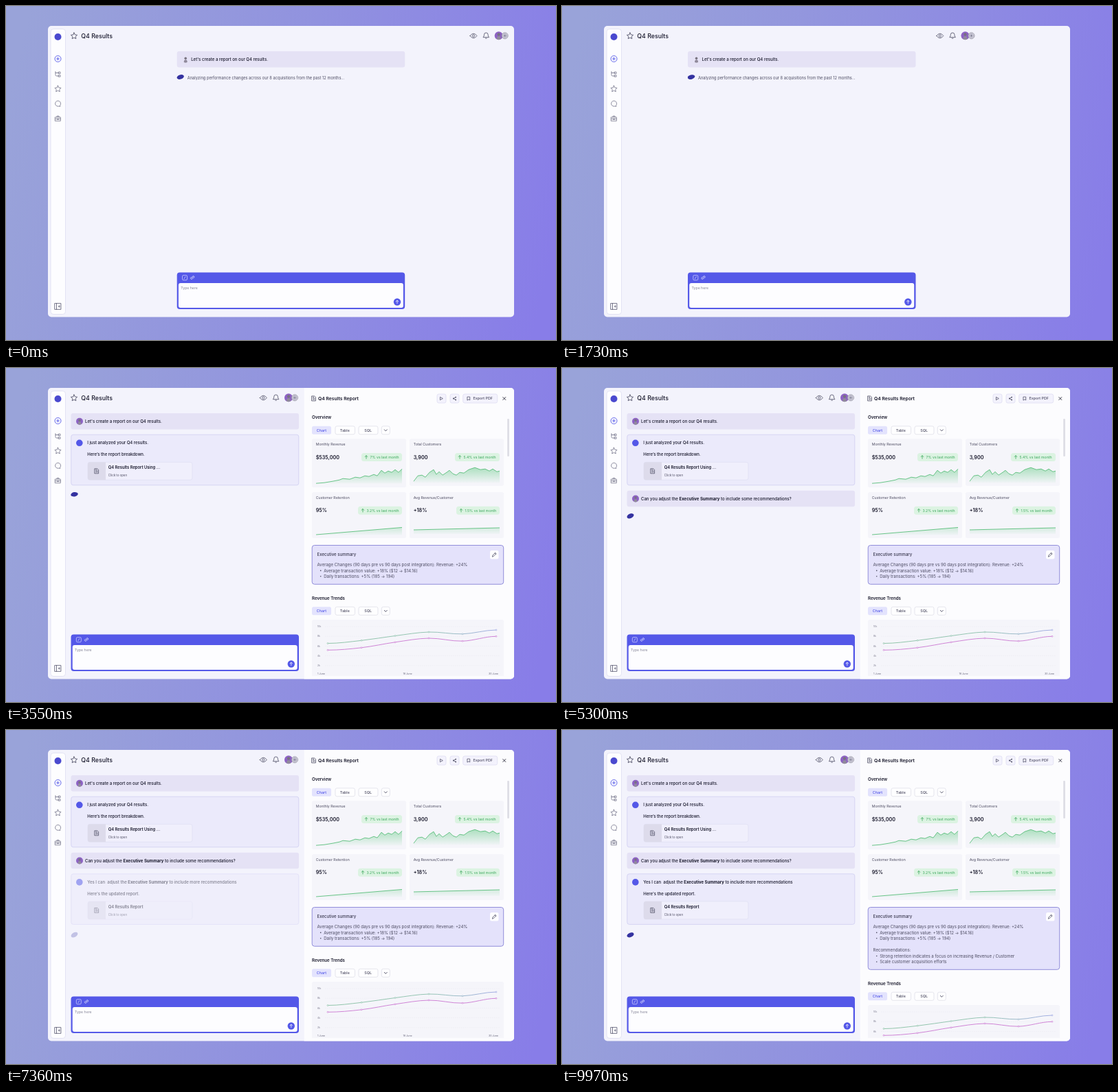
These frames come from a looping animation (800x487 px, 10000 ms). An HTML page with a canvas:

```html
<!DOCTYPE html>
<html lang="en">
<head>
<meta charset="utf-8">
<title>Q4 Results</title>
<style>
html, body { margin: 0; width: 100%; height: 100%; overflow: hidden; background: #9194de; }
canvas { display: block; width: 800px; height: 487px; }
</style>
</head>
<body>
<canvas id="stage"></canvas>
<script>
const W = 800, H = 487, LOOP = 10000;
const canvas = document.getElementById('stage');
const ctx = canvas.getContext('2d');
const dpr = window.devicePixelRatio || 1;
canvas.width = W * dpr;
canvas.height = H * dpr;

const INK = '#17172a', SOFT = '#4c4b61', ICON = '#4a4a60', BLUE = '#5458e8', GREEN = '#38a65a';

function ease(t, from, to) {
  const k = Math.min(1, Math.max(0, (t - from) / (to - from)));
  return k * k * (3 - 2 * k);
}

function group(dx, dy, alpha, draw) {
  if (alpha <= 0) return;
  ctx.save();
  ctx.translate(dx, dy);
  ctx.globalAlpha *= alpha;
  draw();
  ctx.restore();
}

function box(x, y, w, h, r, fill, stroke, width = 0.7) {
  ctx.beginPath();
  ctx.roundRect(x, y, w, h, r);
  if (fill) { ctx.fillStyle = fill; ctx.fill(); }
  if (stroke) { ctx.strokeStyle = stroke; ctx.lineWidth = width; ctx.stroke(); }
}

function disc(x, y, r, fill, stroke, width = 0.8) {
  ctx.beginPath();
  ctx.arc(x, y, r, 0, 7);
  if (fill) { ctx.fillStyle = fill; ctx.fill(); }
  if (stroke) { ctx.strokeStyle = stroke; ctx.lineWidth = width; ctx.stroke(); }
}

// y is the middle of the capitals; parts between asterisks are bold
function text(str, x, y, size, weight = 400, color = INK) {
  ctx.fillStyle = color;
  str.split('*').forEach((part, i) => {
    ctx.font = `${i % 2 ? 700 : weight} ${size}px Inter, sans-serif`;
    ctx.fillText(part, x, y + size * 0.36);
    x += ctx.measureText(part).width;
  });
}

function icon(path, x, y, color = ICON, width = 0.8, fill = false) {
  ctx.save();
  ctx.translate(x, y);
  ctx.lineCap = ctx.lineJoin = 'round';
  ctx.strokeStyle = ctx.fillStyle = color;
  ctx.lineWidth = width;
  const shape = new Path2D(path);
  if (fill) ctx.fill(shape); else ctx.stroke(shape);
  ctx.restore();
}

const PATHS = {
  star: 'M0-4.6 1.4-1.6 4.6-1.2 2.2 1.1 2.8 4.2 0 2.7-2.8 4.2-2.2 1.1-4.6-1.2-1.4-1.6Z',
  plus: 'M-2 0H2M0-2V2',
  branch: 'M-3.5-3.5V1.5Q-3.5 3 -2 3H1M-3.5-1.5H1M1-2.8H3.5V-.4H1ZM1 1.8H3.5V4.2H1Z',
  chat: 'M3.2 3.8 3 2.7A4 4 0 1 0 1.2 3.8Z',
  bag: 'M-3.8-2H3.8V3.6H-3.8ZM-1.5-2V-3.6H1.5V-2M-3.8.6H3.8M-1 .1V1.4H1V.1',
  dock: 'M-4.4-4.4H4.4V4.4H-4.4ZM-2-4.4V4.4M2.4-1.3 1 0 2.4 1.3M1 0H3',
  eye: 'M-5 0Q0-6.8 5 0Q0 6.8-5 0Z',
  bell: 'M-4 2.4Q-2.8 1-2.8-1.2A2.8 2.8 0 0 1 2.8-1.2Q2.8 1 4 2.4ZM-1 4.1Q0 4.8 1 4.1',
  up: 'M0 2.2V-2.2M-1.8-.5 0-2.3 1.8-.5',
  link: 'M-.6.6 1 -1M-.2-1.2 1-2.3A1.5 1.5 0 0 1 2.6-.4L1.4.7M.2 1.2-1 2.3A1.5 1.5 0 0 1-2.6.4L-1.4-.7',
  doc: 'M-2.6-3.5H1.1L2.8-1.8V3.5H-2.6ZM-1.2-.4H1.4M-1.2 1.4H1.4M-1.2-2H0',
  play: 'M-1.5-2 2 0-1.5 2Z',
  share: 'M1.6-1.9-1.6 0 1.6 1.9',
  mark: 'M-1.7-2.4H1.7V2.4L0 1.2-1.7 2.4Z',
  close: 'M-2-2 2 2M2-2-2 2',
  chevron: 'M-2-1 0 1.1 2-1',
  pen: 'M-2.7 2.7-2.2.8 1.5-2.9 2.9-1.5-.8 2.2ZM.7-2.1 2.1-.7'
};

function person(x, y, r, ring) {
  group(x, y, ring, () => disc(0, 0, r, '#8d62c4'));
  ctx.save();
  ctx.beginPath();
  ctx.arc(x, y, r, 0, 7);
  ctx.clip();
  disc(x, y - r * 0.3, r * 0.36, '#77727f');
  ctx.beginPath();
  ctx.ellipse(x, y + r * 0.85, r * 0.5, r * 0.72, 0, 0, 7);
  ctx.fillStyle = '#908a9b';
  ctx.fill();
  ctx.restore();
}

function mascot(y, t) {
  ctx.save();
  ctx.translate(99.5, y + 0.4 * Math.sin(t * Math.PI / 250));
  ctx.rotate(-0.3 + 0.22 * Math.sin(t * Math.PI / 250));
  ctx.beginPath();
  ctx.ellipse(0, 0, 5.3, 3.2, 0, 0, 7);
  ctx.fillStyle = '#3432a0';
  ctx.fill();
  ctx.restore();
}

function backdrop() {
  const g = ctx.createLinearGradient(0, 150, W, 340);
  g.addColorStop(0, '#99a3d9');
  g.addColorStop(0.5, '#9192df');
  g.addColorStop(1, '#887de8');
  ctx.fillStyle = g;
  ctx.fillRect(0, 0, W, H);
  box(61, 29, 678, 424.5, 5, '#f3f3fc');
}

function sidebar() {
  box(65, 33.5, 21.5, 416, 4, '#fdfdff', '#dadaf0');
  disc(75.5, 45, 5, '#4a49cf');
  disc(75.5, 77, 4.5, null, BLUE, 0.9);
  icon(PATHS.plus, 75.5, 77, BLUE, 0.9);
  ['branch', 'star', 'chat', 'bag'].forEach((name, i) =>
    icon(PATHS[name], 75.5, 99 + i * 21.7, '#6a6a82', 0.75));
  icon(PATHS.dock, 75.5, 438, '#55556c');
}

function topbar(dx) {
  icon(PATHS.star, 99, 43.5, ICON, 0.85);
  text('Q4 Results', 109.3, 43.5, 8.8, 500);
  group(dx, 0, 1, () => {
    icon(PATHS.eye, 374.3, 43.5);
    disc(374.3, 43.5, 1.6, null, ICON);
    icon(PATHS.bell, 392.6, 43);
    person(411, 43.3, 6, 1);
    disc(420, 43.3, 4.5, '#e3e2ee', '#8b8997');
    disc(420, 43.3, 2.8, null, '#77758a', 0.6);
    icon('M-1.5 0H1.5M0-1.5V1.5', 420, 43.3, '#55556c', 0.7);
  });
}

function composer() {
  box(94.5, 388.5, 331.5, 53.5, 4, BLUE);
  box(96.7, 404, 327, 36, 3, '#fdfdff');
  box(102.3, 392.7, 7, 7, 1.5, null, '#dcdcff', 0.7);
  icon('M-1 1.6 1-1.6', 105.8, 396.2, '#dcdcff', 0.7);
  icon(PATHS.link, 117, 396, '#e6e6ff', 0.8);
  text('Type here', 100, 411.2, 5.2, 400, '#858497');
  disc(414.8, 431.5, 5.2, BLUE);
  icon(PATHS.up, 414.8, 431.5, '#fff', 0.8);
}

function question(y, str, ring) {
  box(94.5, y - 11.8, 331.5, 23.5, 3, '#e5e2f5');
  person(107, y, 5, ring);
  text(str, 115, y, 6.05, 500);
}

function answer(dy, lines, file) {
  group(0, dy, 1, () => {
    box(94.8, 97.2, 331, 73.6, 3, '#ebeafb', '#cbc9f0');
    disc(106.8, 109.3, 4.8, BLUE);
    text(lines[0], 118.3, 109.2, 6.03, 500);
    text(lines[1], 118.3, 126, 6.03, 500);
    box(119, 137.3, 152, 26, 3, '#f0effc', '#dfdef3');
    box(119, 137.3, 26, 26, [3, 0, 0, 3], '#dddbeb');
    icon(PATHS.doc, 131.8, 150.3, ICON, 0.75);
    text(file, 148.8, 145.4, 5.8, 600);
    text('Click to open', 148.8, 156.5, 4.4, 400, SOFT);
  });
}

function chat(t) {
  const reply = ease(t, 1900, 2060);
  const ask = ease(t, 4400, 4600);
  const update = ease(t, 7220, 7500);
  question(77.7, "Let's create a report on our Q4 results.", reply);
  group(0, 0, 1 - reply, () => {
    mascot(103.5, t);
    text('Analyzing performance changes across our 8 acquisitions from the past 12 months...',
      109.5, 104.6, 5.72, 400, SOFT);
  });
  group(0, 0, reply, () => answer(0,
    ['I just analyzed your Q4 results.', 'Here’s the report breakdown.'], 'Q4 Results Report Using ...'));
  group(0, 0, t < 4400 ? reply : 0, () => mascot(184, t));
  group(0, 0, ask, () => {
    question(190.5, 'Can you adjust the *Executive Summary* to include some recommendations?', 1);
    if (t < 7220) mascot(216, t);
  });
  group(0, 0, update, () => {
    answer(112.6, ['Yes I can  adjust the *Executive Summary* to include more recommendations',
      "Here's the updated report."], 'Q4 Results Report');
    group(0, 0, update, () => mascot(299, t));
  });
  composer();
}

function tabs(y) {
  box(445, y - 6, 28, 12, 2.5, '#e3e3fd');
  text('Chart', 451.8, y, 5.4, 500, BLUE);
  box(479, y - 6, 28.5, 12, 2.5, '#fefeff', '#dcdbe6');
  text('Table', 485.8, y, 5.4, 500, SOFT);
  box(513, y - 6, 28, 12, 2.5, '#fefeff', '#dcdbe6');
  text('SQL', 521.3, y, 5.4, 500, SOFT);
  box(546.3, y - 6, 12, 12, 2.5, '#fefeff', '#dcdbe6');
  icon(PATHS.chevron, 552.3, y, ICON, 0.9);
}

// points alternate x and y, relative to the card
function sparkline(x, y, base, points) {
  const trace = () => {
    ctx.beginPath();
    for (let i = 0; i < points.length; i += 2) ctx.lineTo(x + points[i], y + points[i + 1]);
  };
  const g = ctx.createLinearGradient(0, y + base - 21, 0, y + base);
  g.addColorStop(0, 'rgba(80,196,116,.42)');
  g.addColorStop(1, 'rgba(80,196,116,.03)');
  trace();
  ctx.lineTo(x + points[points.length - 2], y + base);
  ctx.lineTo(x + points[0], y + base);
  ctx.fillStyle = g;
  ctx.fill();
  trace();
  ctx.strokeStyle = '#48b86c';
  ctx.lineWidth = 0.8;
  ctx.stroke();
}

function metric(x, y, h, title, value, change, badge, base, points) {
  box(x, y, 137, h, 2.5, '#f5f5fa');
  text(title, x + 5.7, y + 8.3, 5.25, 400, SOFT);
  text(value, x + 5.7, y + 26.8, 7.2, 600);
  box(x + 131 - badge, y + 20.8, badge, 12, 3.5, '#dcf3e2');
  icon(PATHS.up, x + 138 - badge, y + 26.8, GREEN, 0.8);
  text(change + ' vs last month', x + 143.5 - badge, y + 26.8, 5.2, 400, GREEN);
  sparkline(x, y, base, points);
}

const REVENUE = [6, 65, 18, 64, 30, 62, 40, 60, 45, 58, 55, 59, 63, 56, 70, 57, 77, 54, 83, 55,
  90, 52, 95, 54, 101, 46, 106, 50, 111, 47, 116, 49, 121, 45, 126, 49, 131, 44];
const CUSTOMERS = [6, 62, 12, 54, 18, 53, 23, 56, 29, 49, 35, 45, 39, 52, 43, 48, 48, 53, 54, 49,
  58, 46, 63, 51, 68, 53, 73, 49, 79, 50, 86, 45, 95, 42, 103, 45, 110, 44, 116, 47, 121, 44, 127, 48, 131, 47];

function trend(heights, color) {
  const at = i => [468 + i * 49, heights[i]];
  ctx.beginPath();
  ctx.moveTo(...at(0));
  for (let i = 1; i < heights.length; i++) {
    const slope = j => j > 0 && j < heights.length - 1 ? (heights[j + 1] - heights[j - 1]) / 6 : 0;
    const [x, y] = at(i);
    ctx.bezierCurveTo(x - 32.7, heights[i - 1] + slope(i - 1), x - 16.3, y - slope(i), x, y);
  }
  ctx.strokeStyle = color;
  ctx.lineWidth = 0.9;
  ctx.stroke();
  heights.forEach((_, i) => disc(...at(i), 1, '#f5f5fa', color, 0.6));
}

function summary(grow) {
  box(445.2, 258.5, 278.5, 56.8 + 34 * grow, 3.5, '#e4e2fb', '#8784d6', 0.9);
  text('Executive summary', 452.6, 271.8, 6.05, 500, '#38374d');
  box(704, 266, 12.5, 12.5, 2.5, '#fdfdff');
  icon(PATHS.pen, 710.2, 272.2, ICON, 0.75);
  const bullet = (str, y) => {
    disc(457.7, y, 0.8, SOFT);
    text(str, 462.2, y, 6.05, 400, SOFT);
  };
  text('Average Changes (90 days pre vs 90 days post integration): Revenue: +24%', 452.6, 286.8, 6.05, 400, SOFT);
  bullet('Average transaction value: +18% ($12 -> $14.16)', 295.4);
  bullet('Daily transactions: +5% (185 -> 194)', 303.8);
  group(0, 0, grow * grow, () => {
    text('Recommendations:', 452.6, 321, 6.05, 400, SOFT);
    bullet('Strong retention indicates a focus on increasing Revenue / Customer', 329.5);
    bullet('Scale customer acquisition efforts', 338);
  });
}

function trends() {
  text('Revenue Trends', 445, 335.3, 6.15, 600);
  tabs(354.3);
  box(445, 367, 279, 90, 2.5, '#f5f5fa');
  ctx.setLineDash([1.5, 1.5]);
  ['10k', '8k', '6k', '4k', '2k'].forEach((label, i) => {
    const y = 377 + i * 14.2;
    text(label, 453, y, 3.3, 400, '#77768a');
    ctx.beginPath();
    ctx.moveTo(464, y);
    ctx.lineTo(718, y);
    ctx.strokeStyle = '#e6e5ee';
    ctx.lineWidth = 0.5;
    ctx.stroke();
  });
  ctx.setLineDash([]);
  const g = ctx.createLinearGradient(468, 0, 713, 0);
  g.addColorStop(0, '#85bfa0');
  g.addColorStop(0.6, '#8abfab');
  g.addColorStop(1, '#9aa5e2');
  trend([401.5, 397.3, 390.5, 385, 387.8, 382], g);
  trend([411.3, 407.8, 399.8, 394, 398.2, 391.3], '#cb78d2');
  ['1 June', '16 June', '30 June'].forEach((label, i) =>
    text(label, 453 + i * 124.5, 446, 3.6, 400, '#66657a'));
}

function panel(t) {
  const grow = ease(t, 7550, 7850);
  box(433.7, 29, 305.3, 424.5, [0, 5, 5, 0], '#fcfcfe');
  icon(PATHS.doc, 447.6, 44.4, ICON, 0.8);
  text('Q4 Results Report', 454, 44.5, 6.75, 600);
  [[627, 13], [646, 13], [664.7, 50]].forEach(([x, w]) =>
    box(x, 38, w, 13, 2.5, '#f3f2fd', '#dcdaf0'));
  icon(PATHS.play, 633.3, 44.5, ICON, 0.75);
  icon(PATHS.share, 652.5, 44.5, ICON, 0.75);
  [[-1.6, 0], [1.6, -1.9], [1.6, 1.9]].forEach(([x, y]) => disc(652.5 + x, 44.5 + y, 0.9, ICON));
  icon(PATHS.mark, 673, 44.5, ICON, 0.75);
  text('Export PDF', 679.6, 44.5, 5.3, 500, SOFT);
  icon(PATHS.close, 724.8, 44.5, INK, 0.85);
  box(729.2, 74, 2.7, 55, 1.3, '#dddde5');

  ctx.save();
  ctx.beginPath();
  ctx.rect(434, 56, 295, 393);
  ctx.clip();
  text('Overview', 445, 71.8, 6.1, 600);
  tabs(90.8);
  metric(445, 103.2, 71, 'Monthly Revenue', '$535,000', '7%', 59, 65.3, REVENUE);
  metric(587, 103.2, 68.5, 'Total Customers', '3,900', '5.4%', 65, 64, CUSTOMERS);
  metric(445, 181, 67, 'Customer Retention', '95%', '3.2%', 64, 62.5, [6, 62, 131, 51.5]);
  metric(587, 181, 67, 'Avg Revenue/Customer', '+18%', '1.5%', 63, 61, [6, 55, 131, 52]);
  summary(grow);
  group(0, 34 * grow, 1, trends);
  ctx.restore();
}

function render(t) {
  ctx.setTransform(dpr, 0, 0, dpr, 0, 0);
  const rest = 1 - ease(t, 1590, 1903);
  backdrop();
  sidebar();
  topbar(305.7 * rest);
  group(154.2 * rest, 0, 1, () => chat(t));
  group(0, 0, ease(t, 1950, 2250), () => panel(t));
}

const start = performance.now();
function frame() {
  render((performance.now() - start) % LOOP);
  requestAnimationFrame(frame);
}
frame();
</script>
</body>
</html>
```
